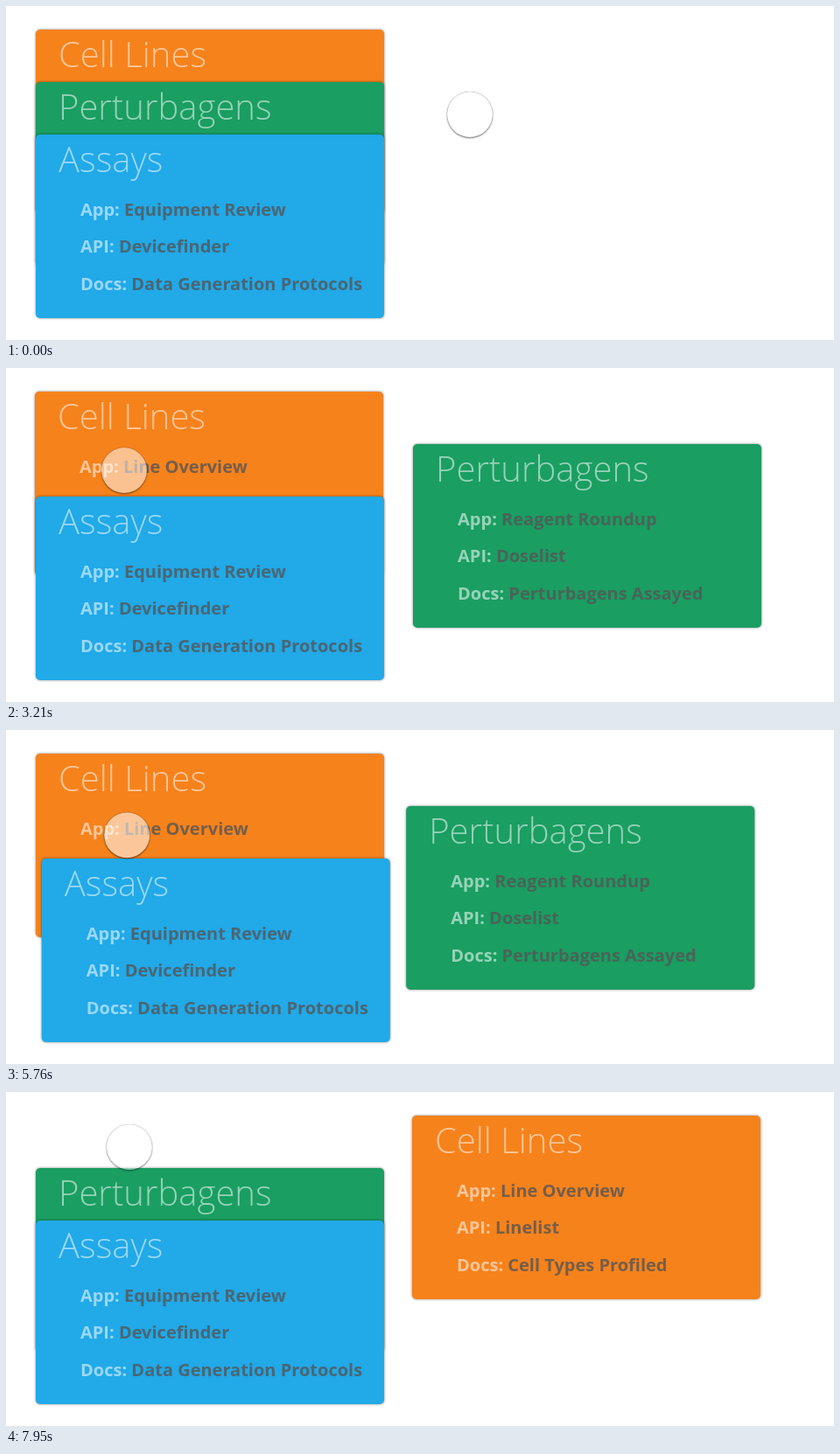
An HTML page that plays this animation: 946 px wide and 382 px high, repeating every 8 s.

```html
<!DOCTYPE html>
<html lang="en">
<head>
<meta charset="utf-8">
<title>Sliding cards</title>
<style>
  html, body {
    margin: 0;
    width: 100%;
    height: 100%;
    overflow: hidden;
    background: #fff;
  }
  #stage {
    position: relative;
    width: 946px;
    height: 382px;
    overflow: hidden;
    font-family: "Open Sans", sans-serif;
    white-space: nowrap;
  }
  .card {
    position: absolute;
    left: 34px;
    width: 398px;
    height: 210px;
    border-radius: 5px;
    box-shadow: 0 0 3px rgba(0, 0, 0, .5);
  }
  .cells { top: 27px; background: #f6821c; }
  .agents { top: 87px; background: #1a9e62; }
  .assays { top: 147px; background: #21a9e8; }
  h2, p {
    position: absolute;
    margin: 0;
    color: rgba(255, 255, 255, .55);
  }
  h2 {
    left: 26px;
    top: 0;
    font-size: 40px;
    font-weight: 300;
    line-height: 55px;
  }
  p {
    left: 51px;
    font-size: 20px;
    font-weight: 700;
    line-height: 24px;
  }
  p:nth-of-type(1) { top: 74px; }
  p:nth-of-type(2) { top: 116px; }
  p:nth-of-type(3) { top: 159px; }
  b { color: rgba(85, 85, 85, .8); }
  #finger {
    position: absolute;
    left: -26px;
    top: -26px;
    width: 52px;
    height: 52px;
    border-radius: 50%;
    background: #fff;
    box-shadow: 0 0 1px #000, 0 1px 2px #000;
  }
</style>
</head>
<body>
<div id="stage">
  <div class="card cells">
    <h2>Cell Lines</h2>
    <p>App: <b>Line Overview</b></p>
    <p>API: <b>Linelist</b></p>
    <p>Docs: <b>Cell Types Profiled</b></p>
  </div>
  <div class="card agents">
    <h2>Perturbagens</h2>
    <p>App: <b>Reagent Roundup</b></p>
    <p>API: <b>Doselist</b></p>
    <p>Docs: <b>Perturbagens Assayed</b></p>
  </div>
  <div class="card assays">
    <h2>Assays</h2>
    <p>App: <b>Equipment Review</b></p>
    <p>API: <b>Devicefinder</b></p>
    <p>Docs: <b>Data Generation Protocols</b></p>
  </div>
  <div id="finger"></div>
</div>
<script>
  const LOOP = 8000, SLIDE = 430, ROW = 60;
  const FIRST_TAP = 1159, TAP_GAP = 1410, LAST_TAP = 4;

  const cards = [...document.querySelectorAll('.card')];
  const finger = document.getElementById('finger');

  // Taps walk down the stack and back up: 0 1 2 1 0
  const cardOf = tap => 2 - Math.abs(2 - tap);
  const mix = (a, b, k) => a + (b - a) * k;

  // Eased progress from 0 at a to 1 at b
  function ease(a, b, t) {
    const k = Math.min(Math.max((t - a) / (b - a), 0), 1);
    return k * k * (3 - 2 * k);
  }

  // Step response of a slightly underdamped spring, time in ms
  function spring(ms) {
    const speed = 12, damping = 0.866;
    const t = speed * ms / 1000;
    const swing = Math.sqrt(1 - damping * damping);
    return 1 - Math.exp(-damping * t) *
      (Math.cos(swing * t) + damping / swing * Math.sin(swing * t));
  }

  // The finger arcs in, then moves to the next title before each tap
  function fingerAt(t, tap, since) {
    const drift = t / 800;
    const arrive = ease(200, 1050, t);
    const next = Math.min(tap + 1, LAST_TAP);
    const row = tap < 0 ? 0
      : mix(cardOf(tap), cardOf(next), ease(0.65, 0.82, since / TAP_GAP));
    const lift = 40 * Math.sin(Math.PI * arrive);
    return [
      mix(530, 131 + drift, arrive),
      mix(124, 53 + drift + ROW * row, arrive) - lift
    ];
  }

  function draw(t) {
    const tap = Math.min(Math.floor((t - FIRST_TAP) / TAP_GAP), LAST_TAP);
    const since = t - FIRST_TAP - tap * TAP_GAP;
    const done = tap < 0 ? 0 : spring(since);

    cards.forEach((card, i) => {
      let x = 0;
      if (cardOf(tap) === i) x = SLIDE * done;
      else if (tap > 0 && cardOf(tap - 1) === i) x = SLIDE * (1 - done);
      card.style.transform = `translateX(${x.toFixed(2)}px)`;
    });

    const press = tap < 0 ? 0.5 : Math.exp(-since / 450);
    const [x, y] = fingerAt(t, tap, since);
    finger.style.opacity = 0.47 + 0.2 * press;
    finger.style.transform = `translate(${x.toFixed(2)}px, ${y.toFixed(2)}px)`;
  }

  const start = performance.now();
  function tick() {
    draw((performance.now() - start) % LOOP);
    requestAnimationFrame(tick);
  }
  tick();
</script>
</body>
</html>
```
